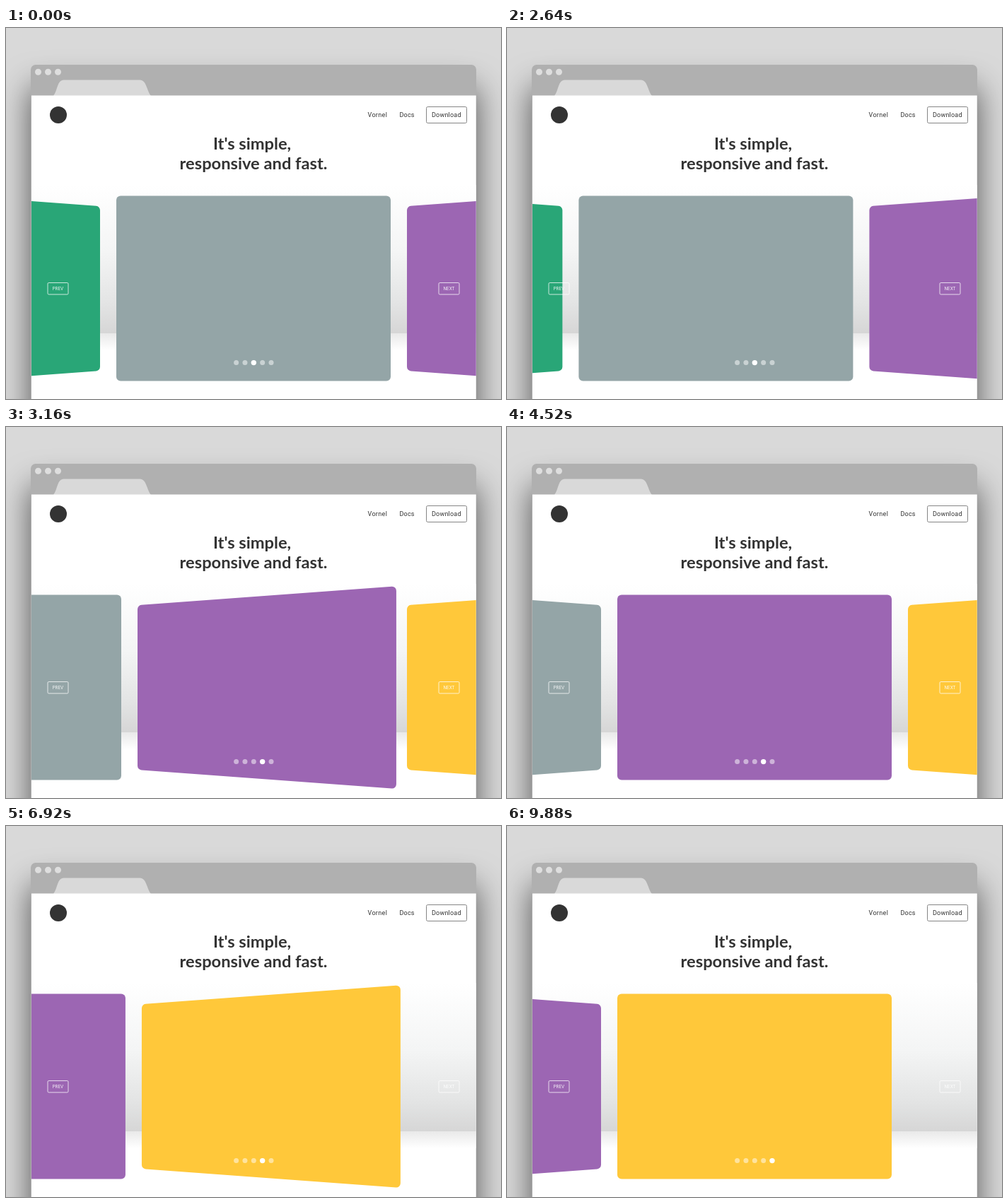
An HTML page with a canvas that plays this animation: 700 px wide and 525 px high, repeating every 9920 ms.

```html
<!DOCTYPE html>
<html lang="en">
<head>
<meta charset="utf-8">
<title>Carousel</title>
<style>
  html, body { margin: 0; width: 100%; height: 100%; overflow: hidden; background: #d9d9d9; }
  canvas { display: block; width: 700px; height: 525px; }
</style>
</head>
<body>
<canvas id="stage"></canvas>
<script>
const W = 700, H = 525, LOOP = 9920, STEP = 40;
const PAGE = { x: 36, y: 95.5, w: 628.7, h: 440 };
const PITCH = 381, HALF_W = 194, HALF_H = 131, MID_Y = 368.6;
const DEPTH = 567, BACK = 11, TILT = Math.PI / 10;
const SLIDES = [[1, '#29a677'], [2, '#94a5a7'], [3, '#9c66b3'], [4, '#ffc83a']];
const FIRST = 2;
// Each step slides the track, then switches the dot and turns the panels.
const MOVES = [2624, 6533];
const SLIDE_MS = 520, TURN_DELAY = 545, TURN_MS = 400, DOT_DELAY = 530;

const canvas = document.getElementById('stage');
const ratio = window.devicePixelRatio || 1;
canvas.width = W * ratio;
canvas.height = H * ratio;
const ctx = canvas.getContext('2d');
ctx.scale(ratio, ratio);

const clamp = (v, lo, hi) => Math.min(hi, Math.max(lo, v));

function bezier(x1, y1, x2, y2) {
  const at = (a, b, s) => 3 * (1 - s) * (1 - s) * s * a + 3 * (1 - s) * s * s * b + s * s * s;
  return u => {
    if (u <= 0) return 0;
    if (u >= 1) return 1;
    let lo = 0, hi = 1;
    for (let i = 0; i < 24; i++) {
      const mid = (lo + hi) / 2;
      if (at(x1, x2, mid) < u) lo = mid; else hi = mid;
    }
    return at(y1, y2, lo);
  };
}
const easeOut = bezier(0.165, 0.84, 0.44, 1);
const ease = bezier(0.25, 0.1, 0.25, 1);

function box(x, y, w, h, r) {
  ctx.beginPath();
  ctx.roundRect(x, y, w, h, r);
}

function disc(x, y, r, color) {
  ctx.fillStyle = color;
  ctx.beginPath();
  ctx.arc(x, y, r, 0, Math.PI * 2);
  ctx.fill();
}

function label(str, x, y, font, color, align = 'left', spacing = 0) {
  ctx.font = font;
  ctx.fillStyle = color;
  ctx.textAlign = align;
  ctx.letterSpacing = spacing + 'px';
  ctx.fillText(str, x, y);
}

function drawWindow() {
  ctx.fillStyle = '#d9d9d9';
  ctx.fillRect(0, 0, W, H);

  ctx.save();
  ctx.shadowColor = 'rgba(0,0,0,0.62)';
  ctx.shadowBlur = 45 * ratio;
  ctx.shadowOffsetY = 32 * ratio;
  ctx.fillStyle = '#b0b0b0';
  box(35, 52, 630, 600, 7);
  ctx.fill();
  ctx.restore();

  [45.5, 59.5, 73.5].forEach(x => disc(x, 62.3, 4.5, '#dedede'));

  ctx.fillStyle = '#d9d9d9';
  ctx.beginPath();
  ctx.moveTo(67, 96);
  ctx.bezierCurveTo(73, 89, 72, 73.5, 82, 73.5);
  ctx.lineTo(189, 73.5);
  ctx.bezierCurveTo(199, 73.5, 199, 89, 205, 96);
  ctx.fill();

  ctx.fillStyle = '#fff';
  ctx.fillRect(PAGE.x, PAGE.y, PAGE.w, PAGE.h);
}

function drawFloor() {
  const wall = ctx.createLinearGradient(0, 222, 0, 432);
  wall.addColorStop(0, '#ffffff');
  wall.addColorStop(0.45, '#f4f5f5');
  wall.addColorStop(0.8, '#e3e4e4');
  wall.addColorStop(1, '#d6d6d6');
  ctx.fillStyle = wall;
  ctx.fillRect(PAGE.x, 222, PAGE.w, 210);

  const floor = ctx.createLinearGradient(0, 432, 0, 456);
  floor.addColorStop(0, '#e9e9e9');
  floor.addColorStop(1, '#ffffff');
  ctx.fillStyle = floor;
  ctx.fillRect(PAGE.x, 432, PAGE.w, 24);
}

function drawHeader() {
  const dark = '#333';
  const nav = '9px Roboto, sans-serif';
  const title = 'bold 23.7px Lato, sans-serif';
  disc(74, 123, 12, dark);
  label('Vornel', 511.5, 126.2, nav, dark, 'left', 0.35);
  label('Docs', 556.5, 126.2, nav, dark, 'left', 0.2);
  label('Download', 602, 126.2, nav, dark, 'left', 0.2);
  ctx.strokeStyle = '#858585';
  ctx.lineWidth = 1;
  box(594.5, 111.5, 57, 23, 2);
  ctx.stroke();
  label("It's simple,", 348, 172, title, dark, 'center');
  label('responsive and fast.', 350, 200, title, dark, 'center');
}

// turn: -1 = left neighbour, 0 = facing, 1 = right neighbour
function drawSlide(cx, turn, color) {
  const project = (sx, sy) => {
    const a = TILT * turn;
    const s = DEPTH / (DEPTH + BACK * Math.abs(turn) - sx * HALF_W * Math.sin(a));
    return [cx + sx * HALF_W * Math.cos(a) * s, MID_Y + sy * HALF_H * s];
  };
  const pts = [[-1, -1], [1, -1], [1, 1], [-1, 1]].map(p => project(...p));
  ctx.fillStyle = color;
  ctx.beginPath();
  ctx.moveTo((pts[0][0] + pts[3][0]) / 2, MID_Y);
  pts.forEach((p, i) => ctx.arcTo(...p, ...pts[(i + 1) % 4], 6));
  ctx.closePath();
  ctx.fill();
}

function drawButton(str, x) {
  ctx.strokeStyle = 'rgba(255,255,255,0.75)';
  ctx.lineWidth = 1;
  box(x, 360.5, 29, 16.5, 1.5);
  ctx.stroke();
  label(str, x + 14.5, 371.1, '6px Inter, sans-serif', 'rgba(255,255,255,0.95)', 'center');
}

function draw(t) {
  let shift = FIRST, facing = FIRST, active = FIRST;
  for (const start of MOVES) {
    shift += easeOut((t - start) / SLIDE_MS);
    facing += ease((t - start - TURN_DELAY) / TURN_MS);
    if (t >= start + DOT_DELAY) active++;
  }

  drawWindow();
  ctx.save();
  ctx.beginPath();
  ctx.rect(PAGE.x, PAGE.y, PAGE.w, PAGE.h);
  ctx.clip();
  drawFloor();
  for (const [i, color] of SLIDES) {
    drawSlide(350 + (i - shift) * PITCH, clamp(i - facing, -1, 1), color);
  }
  drawHeader();
  drawButton('PREV', 59);
  drawButton('NEXT', 612);
  for (let i = 0; i < 5; i++) {
    const on = i === active;
    disc(325.6 + i * 12.35, 473.6, on ? 3.7 : 3.5, on ? '#fff' : 'rgba(255,255,255,0.5)');
  }
  ctx.restore();
}

const begin = performance.now();
function tick() {
  const t = (performance.now() - begin) % LOOP;
  draw(Math.floor(t / STEP) * STEP);
  requestAnimationFrame(tick);
}
tick();
</script>
</body>
</html>
```
